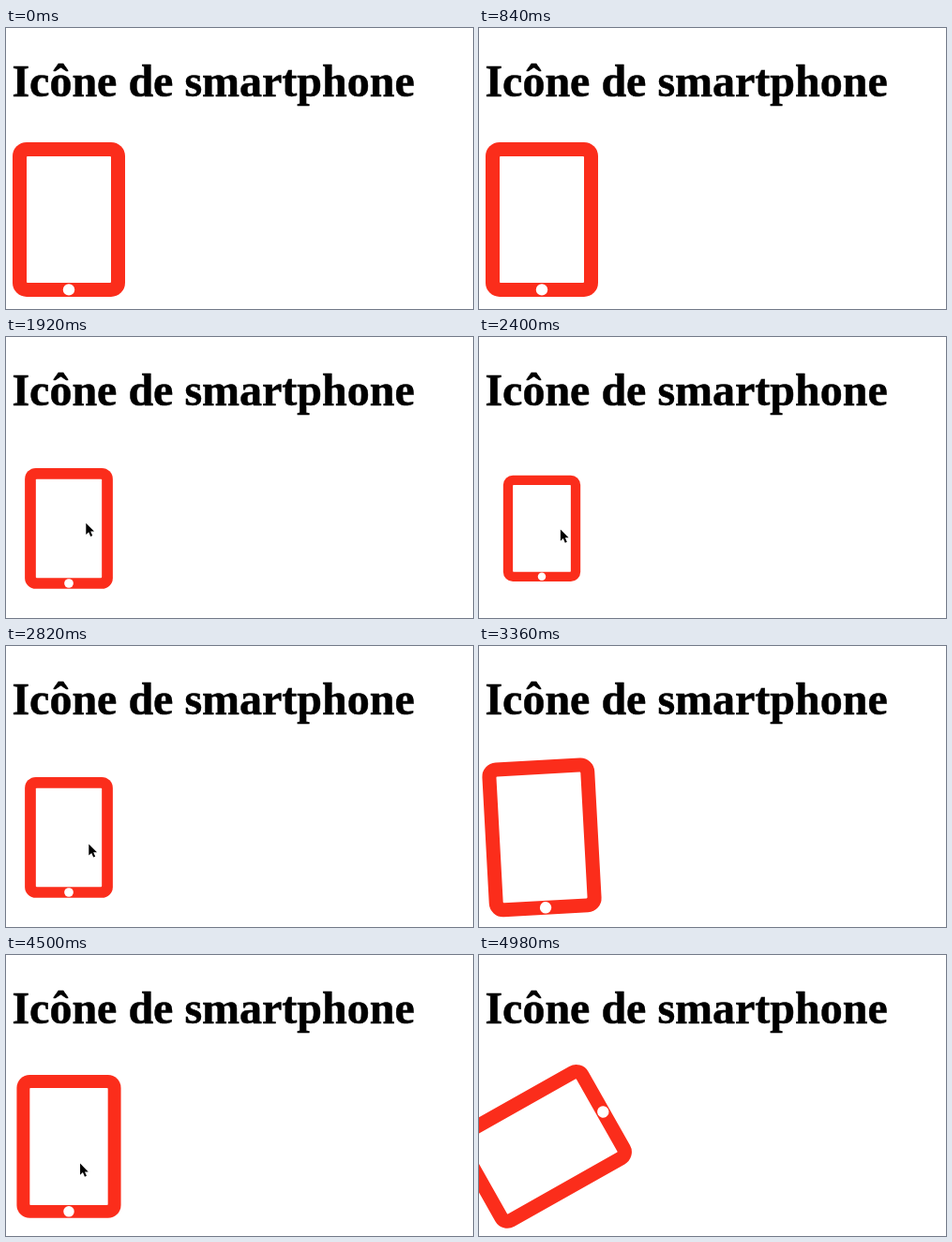
An HTML page for the animation above (5040 ms loop, 498x300 px).

```html
<!DOCTYPE html>
<html lang="fr">
<head>
<meta charset="utf-8">
<title>Icône de smartphone</title>
<style>
  html, body { margin: 0; width: 100%; height: 100%; overflow: hidden; background: #fff; }
  svg { display: block; width: 498px; height: 300px; }
  text { font: bold 48px "Liberation Serif", "Times New Roman", serif; stroke: #000; stroke-width: 0.5px; }
</style>
</head>
<body>
<svg viewBox="0 0 498 300">
  <text x="6.4" y="73">Icône de smartphone</text>
  <g id="tablet">
    <rect x="-60" y="-82.5" width="120" height="165" rx="15" fill="#fb2d1b"/>
    <rect x="-45" y="-67.5" width="90" height="135" rx="1" fill="#fff"/>
    <circle cy="75" r="6.2" fill="#fff"/>
  </g>
  <path id="cursor" d="M0 0V12.2L2.9 9.6L4.9 14.2L6.9 13.3L4.9 8.9H8.7Z"
    stroke="#fff" stroke-width="1.2" stroke-linejoin="round" paint-order="stroke"/>
</svg>
<script>
const LOOP = 5040, STEP = 60, BEAT = 450, MIN_SCALE = 0.4;
const tablet = document.getElementById('tablet');
const cursor = document.getElementById('cursor');

// One turn on load and after each hover; a pulse while hovered.
const spins = [1200, 2940, 4710];
const hovers = [
  { start: 1731, end: 2940, path: [[1740, 122, 233], [1800, 98, 209], [1920, 85.3, 198.7], [2820, 88.3, 211.4], [2880, 89, 229]] },
  { start: 3710, end: 4710, path: [[3720, 98, 263], [3840, 82, 227], [4020, 79.3, 220.5], [4620, 79, 223], [4680, 78, 271]] }
];

// cubic-bezier(.42, 0, .58, 1)
function easeInOut(x) {
  let lo = 0, hi = 1, u = 0.5;
  for (let i = 0; i < 24; i++) {
    u = (lo + hi) / 2;
    const bx = 3 * u * (1 - u) * (0.42 * (1 - u) + 0.58 * u) + u ** 3;
    if (bx < x) lo = u; else hi = u;
  }
  return u * u * (3 - 2 * u);
}

function along(path, t) {
  const next = path.findIndex(p => p[0] > t);
  if (next === 0) return path[0].slice(1);
  if (next < 0) return path[path.length - 1].slice(1);
  const a = path[next - 1], b = path[next], k = (t - a[0]) / (b[0] - a[0]);
  return [1, 2].map(i => a[i] + (b[i] - a[i]) * k);
}

function draw(t) {
  const spin = spins.find(s => t >= s && t < s + BEAT);
  const hover = hovers.find(h => t >= h.start && t < h.end);
  const angle = spin === undefined ? 0 : 360 * easeInOut((t - spin) / BEAT);
  let scale = 1;
  if (hover) {
    const phase = (t - hover.start) / BEAT % 2;
    scale = 1 - (1 - MIN_SCALE) * easeInOut(phase < 1 ? phase : 2 - phase);
    cursor.setAttribute('transform', `translate(${along(hover.path, t)})`);
  }
  cursor.style.display = hover ? '' : 'none';
  tablet.setAttribute('transform', `translate(67 204.4) rotate(${angle}) scale(${scale})`);
}

const begin = performance.now();
function tick() {
  const t = (performance.now() - begin) % LOOP;
  draw(Math.floor(t / STEP) * STEP);
  requestAnimationFrame(tick);
}
tick();
</script>
</body>
</html>
```
